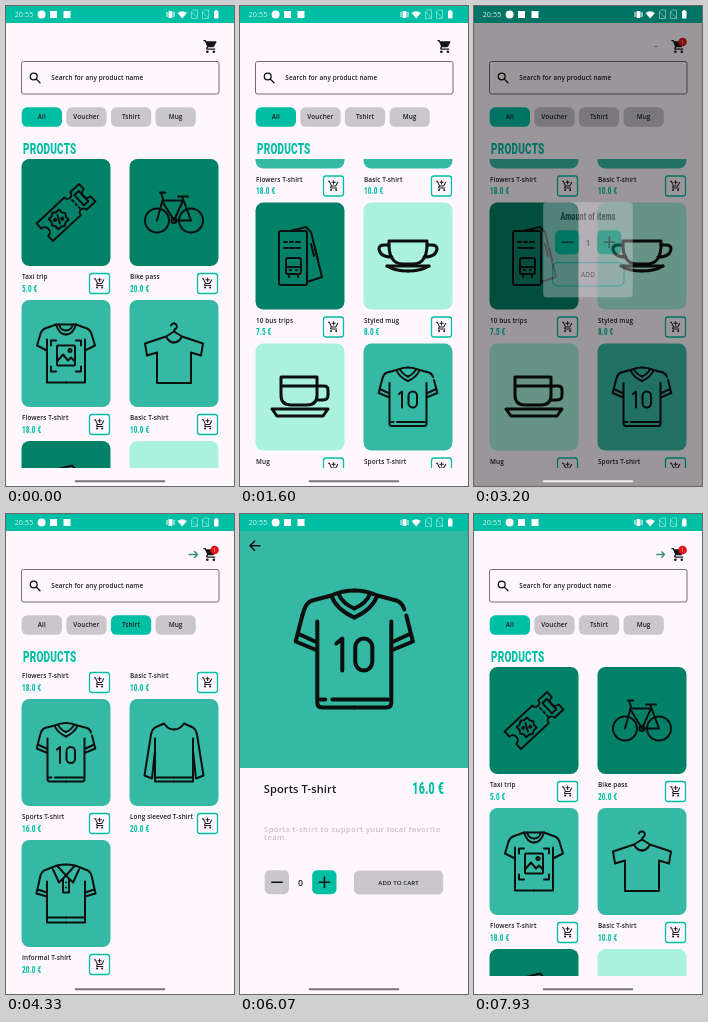
Recreate the animation shown at these times as an HTML page. Size 228 by 480 pixels, loop 8000 ms.

```html
<!DOCTYPE html>
<html lang="en">
<head>
<meta charset="utf-8">
<title>Shop app</title>
<style>
  html, body { margin: 0; width: 100%; height: 100%; overflow: hidden; background: #fef8fe; }
  svg { display: block; width: 228px; height: 480px; }
  text { font: 600 6.4px "Open Sans", "Noto Sans", sans-serif; letter-spacing: .1px; fill: #1c1b1e; }
  .mid { text-anchor: middle; }
  .end { text-anchor: end; }
  .light { font-weight: 500; }
  .wide { letter-spacing: .45px; }
  .narrow { font-family: Roboto, sans-serif; font-weight: 800; letter-spacing: .3px; }
  .teal { fill: #00bfa5; }
  .line { fill: none; stroke: #0b0f0e; stroke-width: 2; stroke-linecap: round; stroke-linejoin: round; }
</style>
</head>
<body>
<svg id="stage" viewBox="0 0 228 480"></svg>
<script>
const TEAL = '#00bfa5', GREY = '#cac7cb', PAPER = '#fef8fe', SHEET = '#e5dfe7';
const DARK = '#018168', SHIRT = '#35b9a5', MINT = '#aaf1de';
const LOOP = 8000, LIST_TOP = 153, ROW = 141;

const path = (d, extra = '') => `<path d="${d}" ${extra}/>`;
const both = d => path(d) + path(d, 'transform="scale(-1 1)"');
const rect = (x, y, w, h, r, fill, extra = '') =>
  `<rect x="${x}" y="${y}" width="${w}" height="${h}" rx="${r}" fill="${fill}" ${extra}/>`;
const circle = (x, y, r, extra = '') => `<circle cx="${x}" cy="${y}" r="${r}" ${extra}/>`;
const text = (x, y, s, size = 6.4, cls = '', extra = '') =>
  `<text x="${x}" y="${y}" class="${cls}" style="font-size:${size}px" ${extra}>${s}</text>`;
const narrow = (x, y, s, size, cls = 'teal') =>
  `<text transform="translate(${x} ${y}) scale(.68 1)" class="narrow ${cls}" style="font-size:${size}px">${s}</text>`;

// Product icons, centred on the origin, about 60 units wide.
const icons = {
  taxi: `<g transform="rotate(-43)">
    ${path('M-29-12H9a4 4 0 0 0 8 0H29V-5a5 5 0 0 0 0 10V12H17a4 4 0 0 0-8 0H-29V5a5 5 0 0 0 0-10Z')}
    ${path('M13-5V6', 'stroke-dasharray="2 3"')}${rect(18, -7, 6, 14, 0, 'none')}
    ${path('M-10-9l3 2 4 0 0 4 2 3-2 3 0 4-4 0-3 2-3-2-4 0 0-4-2-3 2-3 0-4 4 0Z')}
    ${path('M-8-4l-4 8')}${circle(-13, -2, 1)}${circle(-7, 2, 1)}</g>`,
  bike: circle(-17, 8, 12) + circle(17, 8, 12) +
    path('M-14-20h5.500M-13-20l2 6-6 22M-11-12H9L0 8-11-10M4-16h10M8-16l2 5 7 19H0') + circle(0, 8, 2.5),
  flowers: both('M10-29l11 4Q25-23 26-18L29-8 19-3M19-14V29H0M10-29Q7-19 0-19M7-29Q5-23 0-23M15-8V-13H10M15 13V18H10') +
    path('M-10-29H10') + rect(-9, -8, 18, 20, 1, 'none') + path('M-9 8l6-7 5 6 3-3 4 4') + circle(4, -3, 1.5),
  basic: both('M8-17l21 7-2 12-10-3V29.500H0M8-17Q5-11 0-11M8-17L0-22') + path('M0-22q0-2 2-3a3 3 0 1 0-5-3'),
  bus: rect(-21, -25, 28, 54, 2, 'none') + path('M-10-25L6-29l5 5 11 45-15 5') +
    path('M-16-14h3M-10-14h3M-4-14h6M-16-8h18', 'stroke-dasharray="4 2"') +
    rect(-14, 2, 15, 16, 2, 'none') + path('M-14 11H1M-11 18v3M-2 18v3M-10 14h1M-4 14h1M11-12l3 12M15-8l3 12'),
  bowl: `<g stroke-width="3">${path('M-19-15H19Q20 8 5 8H-5Q-20 8-19-15Z')}
    ${both('M19-11H24Q29-11 29-7 28 1 16 1M21 10Q13 15 0 15')}${path('M-21 10H21')}</g>`,
  mug: `<g stroke-width="3">${path('M-19-20H17V-2Q17 8 7 8H-9Q-19 8-19-2ZM-19-11H17')}
    ${path('M17-11h7q4 0 4 4v5q0 5-5 5H16M-28 12H28L23 19H-23Z')}</g>`,
  sports: both('M11.500-27L21-24.500Q24-23.500 25-20M26-17l3.300 13L18.500 .5M28.300-8L18.500-3.500M18.500-14V26.500Q18.500 29 16 29H0M11.500-27Q9-20 0-16M8-28Q6-23 0-20.500M11.500-27Q6-29.500 0-29.500') +
    path('M-25-20l-1 3M-17 25h2.500M-11 25H17M-9-3l3-2.500V10.500') + rect(.5, -5.5, 8.5, 16, 4.25, 'none'),
  long: both('M10-29l9 4Q22-23 23-18L29.500 23 22 26 19-2M19-14V29H0M10-29Q6-23 0-23M19 25H0'),
  polo: both('M9-28l13 5Q25-21 26-16L29.500 0 19 3M28.500-4L19-1M19-12V29H0M9-28L0-18 7-11 13-24M9-28Q5-29 0-29M19 24H0') +
    path('M-3-14V-1H3V-14M0-11v0M0-6v0'),
};

const cartBody = 'M7 18a2 2 0 1 0 0 4 2 2 0 0 0 0-4zm10 0a2 2 0 1 0 0 4 2 2 0 0 0 0-4z';
const cartIcon = cartBody + 'M1 2v2h2l3.600 7.590-1.350 2.450C4.500 15.400 5.500 17 7 17h12v-2H7.420l-.2-.4.900-1.600h7.450c.75 0 1.410-.41 1.750-1.030l3.580-6.490A1 1 0 0 0 20 4H5.210l-.94-2z';
const cartAddIcon = cartBody + 'M11 9h2V6h3V4h-3V1h-2v3H8v2h3zM1 2v2h2l3.600 7.590-1.350 2.450C4.500 15.400 5.500 17 7 17h12v-2H7.420l-.2-.4.900-1.600h7.450c.75 0 1.410-.41 1.750-1.030l3.860-7L19.420 4 15.550 11H8.530L4.270 2z';

const products = [
  ['Taxi trip', '5.0', 'taxi', DARK], ['Bike pass', '20.0', 'bike', DARK],
  ['Flowers T-shirt', '18.0', 'flowers', SHIRT], ['Basic T-shirt', '10.0', 'basic', SHIRT],
  ['10 bus trips', '7.5', 'bus', DARK], ['Styled mug', '8.0', 'bowl', MINT],
  ['Mug', '6.0', 'mug', MINT], ['Sports T-shirt', '16.0', 'sports', SHIRT],
  ['Long sleeved T-shirt', '20.0', 'long', SHIRT], ['Informal T-shirt', '20.0', 'polo', SHIRT],
];

const card = ([name, price, icon, colour], i) => `
  <g transform="translate(${i % 2 ? 123.5 : 15.5} ${LIST_TOP + ROW * (i >> 1)})">
    ${rect(0, 0, 89, 107, 8, colour)}
    <g class="line" transform="translate(44.5 53.5)">${icons[icon]}</g>
    ${text(.5, 120.3, name)}${narrow(.5, 132.7, price + ' €', 9.3)}
    ${rect(68, 114.5, 20, 20, 2.5, PAPER, `stroke="${TEAL}" stroke-width="1.3"`)}
    ${path(cartAddIcon, 'transform="translate(72 118.3) scale(.51)" fill="#1c1b1e"')}
  </g>`;

const chips = ['All', 'Voucher', 'Tshirt', 'Mug'].map((name, i) =>
  rect(15.7 + 44.6 * i, 101.3, 40.3, 19.5, 5.5, GREY, 'class="chip"') +
  text(35.8 + 44.6 * i, 113.2, name, 6.4, 'mid')).join('');

const stepper = (x, y, gap, id) => `
  ${rect(x, y, 24.3, 24, 5, GREY, `id="${id}Minus"`)}${rect(x + gap, y, 24.3, 24, 5, TEAL)}
  <path class="line" style="stroke-width:1.6" d="M${x + 7} ${y + 12}h10.500M${x + gap + 7} ${y + 12}h10.500m-5.250-5.250v10.500"/>
  ${text(x + gap / 2 + 12.1, y + 15.3, '0', 8.8, 'mid', `id="${id}Count"`)}`;

const simIcon = x => path(`M${x} 5.500l2-1.500h4v8.500h-6zM${x} 6l6 6`, 'fill="none" stroke="#fff" stroke-width=".8" opacity=".55"');
const statusBar = `
  ${text(8.7, 11.2, '20:55', 7.1, 'light', 'fill-opacity=".85" id="clock"')}
  <g fill="#fff">${circle(35.6, 8.5, 4)}${rect(44, 5, 7, 7, 0, '#fff')}${rect(57.5, 5, 7, 7, 0, '#fff')}
    ${rect(162.5, 5, 4, 7, .8, '#fff')}
    ${path('M161 6v5M168 6v5', 'stroke="#fff"')}
    ${path('M171.500 7q4.700-3.500 9.400 0l-4.700 5.500z')}
    ${simIcon(185.5)}${simIcon(196.5)}
    ${rect(208, 5, 4.5, 7.5, .7, '#fff')}${rect(209.3, 4, 2, 2, 0, '#fff')}</g>`;

const $ = id => document.getElementById(id);
$('stage').innerHTML = `
  <clipPath id="window">${rect(0, LIST_TOP, 228, 309, 0, '#000')}</clipPath>
  ${rect(0, 0, 228, 480, 0, PAPER)}
  ${path(cartIcon, 'transform="translate(196.8 32.7) scale(.65)" fill="#151417"')}
  <g id="badge">${circle(208.6, 36, 4.3, 'fill="#e3131b"')}${text(208.6, 37.9, '1', 5, 'mid light', 'fill-opacity=".85"')}</g>
  <path id="arrow" fill="none" stroke="#3f917d"/>
  ${rect(15.5, 55.5, 197.5, 32.5, 2, 'none', 'stroke="#6f6c72"')}
  <g class="line" style="stroke-width:1.3">${circle(27.7, 70.5, 3.4)}${path('M30.300 73.100l3.700 3.700')}</g>
  ${text(45.3, 74, 'Search for any product name')}
  ${chips}
  ${narrow(17, 148, 'PRODUCTS', 14.7)}
  <g clip-path="url(#window)">
    <g id="allList">${products.map(card).join('')}</g>
    <g id="shirtList">${products.filter(p => p[3] === SHIRT).map(card).join('')}</g>
  </g>
  <g id="detail">
    ${rect(0, 0, 228, 480, 0, PAPER)}${rect(0, 16, 228, 238, 0, SHIRT)}
    <path class="line" style="stroke-width:1.4;stroke-linecap:butt" d="M20.500 31.700H10M15 26.700l-5 5 5 5"/>
    <g class="line" transform="translate(114.3 135.5) scale(2)">${icons.sports}</g>
    ${text(23.7, 279, 'Sports T-shirt', 11.1)}
    ${narrow(204, 279.8, '16.0 €', 15.6, 'teal end')}
    <g opacity=".25">${text(24, 318, 'Sports t-shirt to support your local favorite', 7.6, 'wide')}
    ${text(24, 326, 'team.', 7.6, 'wide')}</g>
    ${stepper(24.7, 356.3, 47.5, 'detail')}
    ${rect(114, 356.5, 89.2, 24, 5, GREY)}${text(158.6, 370.5, 'ADD TO CART', 6.1, 'mid')}
  </g>
  ${rect(0, 0, 228, 17, 0, TEAL)}
  <rect id="dim" width="228" height="480"/>
  ${statusBar}
  ${rect(68.7, 474.2, 90.6, 2, 1, '#77747a', 'id="pill"')}
  <g id="dialog">
    ${rect(69.2, 196.3, 89.5, 95, 3.5, SHEET)}
    ${narrow(114, 214.2, 'Amount of items', 10.2, 'mid')}
    ${stepper(81, 224.3, 42, 'dialog')}
    ${rect(78.5, 256.7, 71.5, 23.3, 5, GREY, 'id="add"')}${text(114, 270.6, 'ADD', 6.4, 'mid')}
  </g>`;
$('clock').style.fill = $('badge').lastChild.style.fill = '#fff';

const chipRects = document.querySelectorAll('.chip');
const ramp = (t, from, to) => Math.min(1, Math.max(0, (t - from) / (to - from)));
const smooth = u => u * u * (3 - 2 * u);
const show = (id, visible) => { $(id).style.display = visible ? '' : 'none'; };
const fade = (id, opacity) => { $(id).style.opacity = opacity; };

function draw(t) {
  const filtered = t >= 3930 && t < 7000;
  const scroll = t < 3930 ? 238.5 * (1 - (1 - ramp(t, 230, 1080)) ** 2.5) : filtered ? 109 : 0;
  show('allList', !filtered);
  show('shirtList', filtered);
  $(filtered ? 'shirtList' : 'allList').setAttribute('transform', `translate(0 ${-scroll})`);
  chipRects.forEach((chip, i) => chip.setAttribute('fill', i === (filtered ? 2 : 0) ? TEAL : GREY));

  const dim = .59 * ramp(t, 1700, 1950) * (1 - ramp(t, 3095, 3415));
  fade('dim', dim);
  $('pill').setAttribute('fill', dim > .1 ? '#eee' : '#77747a');
  fade('dialog', ramp(t, 1720, 1900) * (1 - ramp(t, 3120, 3245)));
  const chosen = t >= 2400;
  $('dialogCount').textContent = chosen ? 1 : 0;
  $('dialogMinus').setAttribute('fill', chosen ? TEAL : GREY);
  $('add').setAttribute('fill', chosen ? SHEET : GREY);
  $('add').setAttribute('stroke', chosen ? TEAL : 'none');

  show('badge', t >= 3130);
  const grow = t < 7000 ? ramp(t, 3170, 3670) : ramp(t, 7400, 8000);
  const tail = 180.5 + 2 * grow, tip = tail + 2 + 7 * grow, head = 3.4 * grow;
  show('arrow', grow > 0);
  $('arrow').setAttribute('d', `M${tail} 40.500H${tip}M${tip - head} ${40.5 - head}L${tip} 40.500l${-head} ${head}`);
  $('arrow').setAttribute('stroke-width', .7 + .8 * grow);

  const detail = smooth(ramp(t, 5010, 5420)) * (1 - smooth(ramp(t, 7220, 7620)));
  show('detail', detail > 0);
  fade('detail', detail);
}

function tick() {
  draw(performance.now() % LOOP);
  requestAnimationFrame(tick);
}
tick();
</script>
</body>
</html>
```
